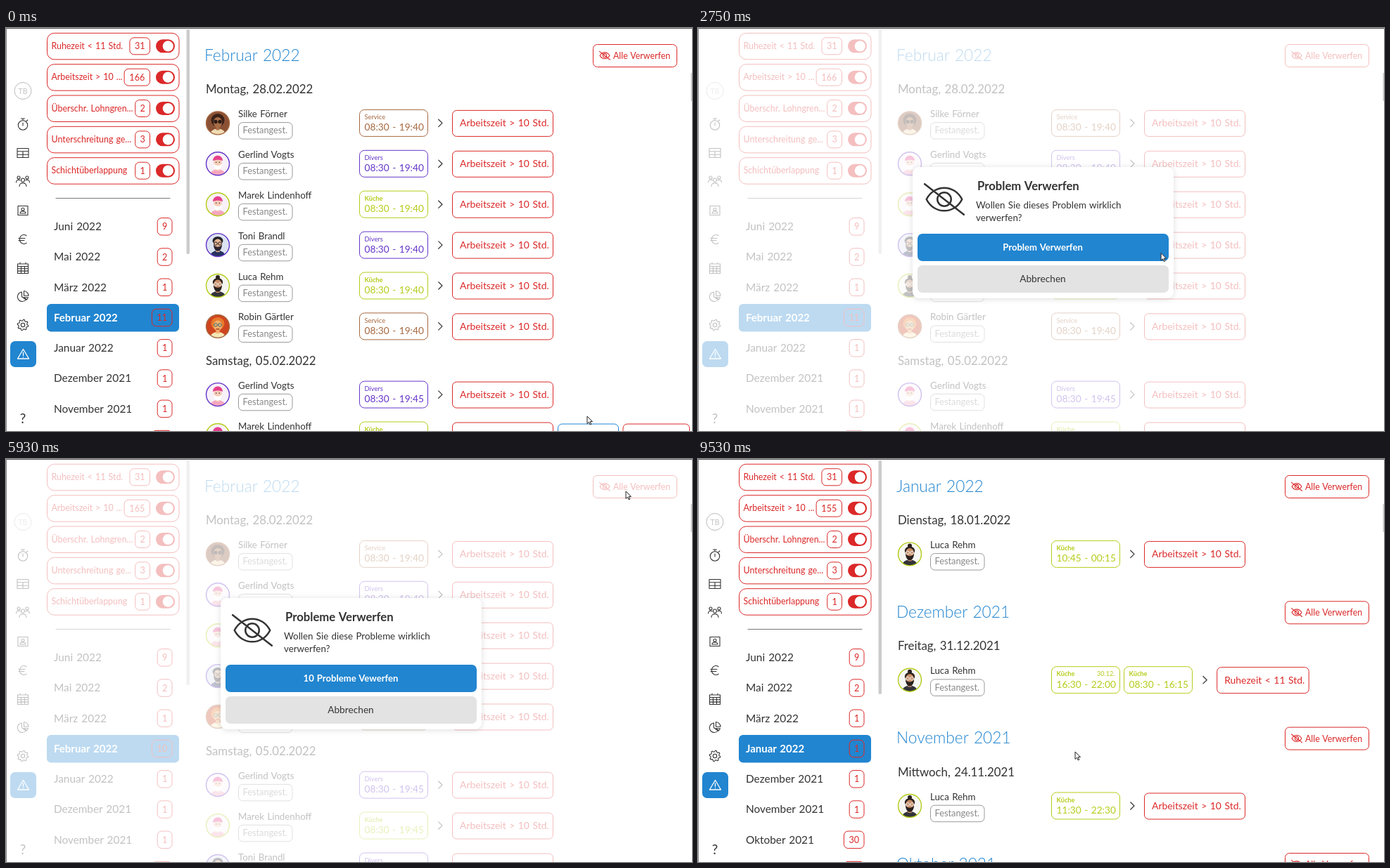
An HTML page for the animation above (9.55 s loop, 975 by 574 pixels).

```html
<!DOCTYPE html>
<html lang="de">
<head>
<meta charset="utf-8">
<title>Probleme verwerfen</title>
<style>
  html, body { margin: 0; width: 100%; height: 100%; overflow: hidden; background: #fff; }
  svg { display: block; width: 100vw; height: 100vh; }
  text { font-family: Lato, "Open Sans", sans-serif; word-spacing: .07em; white-space: pre; }
  .dialog { filter: drop-shadow(0 1px 4px #0002); }
</style>
</head>
<body>
<svg id="stage" viewBox="0 0 975 574"></svg>
<script>
const LOOP = 9550;
const BLUE = '#2185d0', RED = '#db2828', VIOLET = '#6435c9', GREEN = '#b5cc18', BROWN = '#a5673f', INK = '#333';

// Drawing helpers
const text = (x, y, s, size, fill = INK, more = '') =>
  `<text x="${x}" y="${y}" font-size="${size}" fill="${fill}" ${more}>${s.replace('<', '&lt;')}</text>`;
const mid = (x, y, s, size, fill, more = '') => text(x, y, s, size, fill, `text-anchor="middle" ${more}`);
const box = (x, y, w, h, r, stroke, fill = 'none') =>
  `<rect x="${x}" y="${y}" width="${w}" height="${h}" rx="${r}" fill="${fill}" stroke="${stroke}"/>`;
const at = (x, y, body, more = '') => `<g transform="translate(${x} ${y})" ${more}>${body}</g>`;
const line = (d, stroke = INK, w = 1.2) =>
  `<path d="${d}" fill="none" stroke="${stroke}" stroke-width="${w}" stroke-linecap="round" stroke-linejoin="round"/>`;
const disc = (x, y, r, fill) => `<circle cx="${x}" cy="${y}" r="${r}" fill="${fill}"/>`;
const oval = (x, y, rx, ry, fill) => `<ellipse cx="${x}" cy="${y}" rx="${rx}" ry="${ry}" fill="${fill}"/>`;
const ringPath = (x, y, r) => `M${x - r} ${y}a${r} ${r} 0 1 0 ${2 * r} 0a${r} ${r} 0 1 0 ${-2 * r} 0`;

const eye = (x, y, scale, color, w) => at(x, y, `<g transform="scale(${scale})">` +
  line('M-8.8 0C-5-7.6 5-7.6 8.8 0C5 7.6-5 7.6-8.8 0Z' + ringPath(0, 0, 3.4) + 'M-9.7-7.6L9.7 7.6', color, w / scale) + '</g>');

// Avatars
const glasses = color => line(ringPath(-3, -2, 2.3) + ringPath(3, -2, 2.3), color, 1);
const shades = disc(-3, -2, 2.6, '#2a1a14') + disc(3, -2, 2.6, '#2a1a14');
const beard = color => `<path d="M-6-1C-6 12 6 12 6-1C4 4-4 4-6-1Z" fill="${color}"/>`;
const faces = {
  afro: { bg: '#8b5135', back: disc(0, -4, 9.5, '#3b2218'), skin: '#a86d47', shirt: '#efdcb5', front: shades },
  cap: { bg: '#f8f1f8', back: '', skin: '#f6cdb9', shirt: '#f4a6bd',
    front: beard('#fff') + '<path d="M-7-4C-7-14 7-14 7-4C3-6-3-6-7-4Z" fill="#e6408a"/>' + disc(-2.3, -2, .8, INK) + disc(2.3, -2, .8, INK) },
  quiff: { bg: '#dbe3f1', back: oval(0, -6, 7.5, 6, '#23222b'), skin: '#e9b896', shirt: '#27335f', front: beard('#2c2530') + glasses('#222') },
  bun: { bg: '#f6f6f2', back: disc(0, -12, 3, '#2a211e') + oval(0, -5, 7.2, 6, '#2a211e'), skin: '#c98f68', shirt: '#33343b', front: beard('#2a211e') + glasses('#eee') },
  curls: { bg: '#cf4520', back: oval(0, -4, 9.5, 9, '#e87a2c'), skin: '#f2ae6b', shirt: '#f5e6b5', front: glasses('#3c6f78') + line('M-2 4H2', '#a32b18') }
};
function avatar(x, y, ring, kind) {
  const f = faces[kind];
  return at(x, y, `<g clip-path="url(#round)">${disc(0, 0, 17, f.bg)}${f.back}${oval(0, 16, 11, 8, f.shirt)}` +
    `<rect x="-2.5" y="4" width="5" height="6" fill="${f.skin}"/>${oval(0, -1, 6, 7.5, f.skin)}${f.front}</g>` +
    `<circle r="16.5" fill="none" stroke="${ring}" stroke-width="1.4"/>`);
}

// Main column
const areas = { Service: BROWN, Divers: VIOLET, Küche: GREEN };
const people = {
  silke: ['Silke Förner', 'Service', 'afro'],
  gerlind: ['Gerlind Vogts', 'Divers', 'cap'],
  marek: ['Marek Lindenhoff', 'Küche', 'cap'],
  toni: ['Toni Brandl', 'Divers', 'quiff'],
  luca: ['Luca Rehm', 'Küche', 'bun'],
  robin: ['Robin Gärtler', 'Service', 'curls']
};
const LONG = 'Arbeitszeit > 10 Std.', REST = 'Ruhezeit < 11 Std.';

function shift(x, area, time, day = '') {
  const c = areas[area];
  return box(x + .5, -19, 97, 38, 7, c) +
    text(x + 7.5, -5.3, area, 9.3, c, area === 'Küche' ? 'font-weight="700"' : '') +
    text(x + 65, -5.3, day, 9.1, c) + text(x + 7.5, 11, time, 13.7, c);
}
function row(y, who, time, extra) {
  const [name, area, face] = people[who];
  const dx = extra ? 103.2 : 0;
  return at(0, y, avatar(301, 0, areas[area], face) +
    text(330, -8.5, name, 13.3) + box(330.5, -.8, 76.5, 23.5, 6, '#999') + text(336.5, 15, 'Festangest.', 12.8, '#888') +
    shift(502, area, time, extra && '30.12.') + (extra ? shift(605, area, extra) : '') +
    at(dx, 0, line('M614.7-5.2L620 0L614.7 5.2') + box(634.5, -18, extra ? 130.5 : 143, 37, 6, RED) +
      text(645, 5, extra ? REST : LONG, 13.9, RED)));
}
const title = (y, s) => text(282, y + 7.8, s, 22.7, BLUE, 'font-weight="300"') +
  box(834.5, y - 15.5, 119, 32, 6, RED) + eye(851, y + .3, .78, RED, 1.1) + text(863, y + 5, 'Alle Verwerfen', 12.4, RED);
const day = (y, s) => text(284, y + 6, s, 16.8);

const PITCH = 57.9;
function february(monday) {
  const sat = 135.4 + PITCH * monday.length - 9;
  return title(39, 'Februar 2022') + day(87, 'Montag, 28.02.2022') +
    monday.map((w, i) => row(135.4 + PITCH * i, w, '08:30 - 19:40')).join('') +
    day(sat, 'Samstag, 05.02.2022') +
    ['gerlind', 'marek', 'toni'].map((w, i) => row(sat + 48.3 + PITCH * i, w, '08:30 - 19:45')).join('');
}
function older() {
  const months = [
    ['Januar 2022', 'Dienstag, 18.01.2022', '10:45 - 00:15'],
    ['Dezember 2021', 'Freitag, 31.12.2021', '16:30 - 22:00', '08:30 - 16:15'],
    ['November 2021', 'Mittwoch, 24.11.2021', '11:30 - 22:30']
  ];
  return months.map(([m, d, time, extra], i) =>
    at(0, 179.3 * i, title(39, m) + day(87, d) + row(135.4, 'luca', time, extra))).join('') + title(577, 'Oktober 2021');
}

// Sidebar
function badge(right, y, n, h) {
  const w = 13 + 7.8 * String(n).length;
  return box(right - w, y - h / 2, w, h, 6, RED) + mid(right - w / 2, y + 4.5, String(n), 12.6, RED);
}
function sidebar(total, months, bar) {
  const filters = [['Ruhezeit < 11 Std.', 31], ['Arbeitszeit > 10 ...', total], ['Überschr. Lohngren...', 2],
    ['Unterschreitung ge...', 3], ['Schichtüberlappung', 1]];
  return filters.map(([s, n], i) => at(0, 25.8 + 44.35 * i,
      box(58.5, -18.5, 187.5, 37.5, 10, RED) + text(64.5, 4.2, s, 12.4, RED) + badge(204.5, 0, n, 24) +
      `<rect x="213" y="-9.5" width="27" height="19" rx="9.5" fill="${RED}"/>` + disc(230.3, 0, 7.6, '#fff'))).join('') +
    line('M71 242.5H233', '#777', 1) +
    months.map(([s, n], i) => at(0, 282.8 + 43.25 * i, i === 3
      ? `<rect x="58" y="-19.5" width="188" height="39.5" rx="6" fill="${BLUE}"/>` +
        text(68, 5.2, s, 15, '#fff', 'font-weight="700"') + badge(236, 0, n, 24.5)
      : text(68, 5.4, s, 15.4) + badge(236, 0, n, 24.5))).join('') +
    `<rect x="256.5" y="2" width="4.5" height="${bar}" rx="2" fill="#ccc"/>`;
}
const head = [['Juni 2022', 9], ['Mai 2022', 2], ['März 2022', 1]];
const tail = [['Januar 2022', 1], ['Dezember 2021', 1], ['November 2021', 1], ['Oktober 2021', 30]];
const scenes = [
  sidebar(166, [...head, ['Februar 2022', 11], ...tail], 320) + february(['silke', 'gerlind', 'marek', 'toni', 'luca', 'robin']),
  sidebar(165, [...head, ['Februar 2022', 10], ...tail], 320) + february(['silke', 'gerlind', 'marek', 'toni', 'robin']),
  sidebar(155, [...head, ...tail, ['September 2021', 24]], 333) + older()
];

// Icon rail
const icons = [
  [137, ringPath(0, 1.5, 6.7) + 'M-2.5-8H2.5M0-8V-5.2M0 2V-2M5.2-4.5L6.8-6'],
  [178, 'M-8-6.5H8V6.5H-8ZM-8-2.2H8M-8 2.2H8M0-2.2V6.5'],
  [218, ringPath(0, -1.5, 2.5) + ringPath(-6, -5, 2) + ringPath(6, -5, 2) + 'M-5 7.5C-5 1 5 1 5 7.5M-9.5 2C-9.5-2-6-2.5-4-1M9.5 2C9.5-2 6-2.5 4-1'],
  [260, 'M-7-6.5H7V6.5H-7Z' + ringPath(0, -1.8, 2) + 'M-4 4C-4 0 4 0 4 4Z'],
  [301, 'M5-5.2A6 6.5 0 1 0 5 5.2M-6-1.5H3M-6 1.5H2'],
  [342, 'M-7.5-6H7.5V7.5H-7.5ZM-7.5-2.5H7.5M-7.5 .8H7.5M-7.5 4.1H7.5M-2.5-2.5V7.5M2.5-2.5V7.5M-4-8V-6M4-8V-6'],
  [382, 'M-1.5-6A6.8 6.8 0 1 0 4.5 5L-1.5 .8ZM1.5-7.5A7 7 0 0 1 8-.8H1.5ZM1.5 1.8H7.5L5.5 5Z']
];
const gear = Array.from({ length: 32 }, (_, i) => {
  const r = i % 4 < 2 ? 7.8 : 6, a = (i + .5) * Math.PI / 16;
  return `${i ? 'L' : 'M'}${(r * Math.cos(a)).toFixed(2)} ${(r * Math.sin(a)).toFixed(2)}`;
}).join('') + 'Z' + ringPath(0, 0, 2.7);
const rail = box(12, 77.5, 24, 24, 12, '#bbb') + mid(24, 93.5, 'TB', 10.5, '#c4c4c4') +
  [...icons, [423, gear]].map(([y, d]) => at(24, y, line(d, INK, 1.1))).join('') +
  `<rect x="6" y="446" width="37" height="37" rx="7" fill="${BLUE}"/>` +
  at(24.5, 464.5, line('M0-7L8 6.5H-8ZM0-2.5V2M0 4.2V4.3', '#fff', 1.3)) + mid(24, 563, '?', 19);

// Row actions, dialogs, pointers
const actions = box(784.5, -16, 86, 32, 6, BLUE) +
  at(801, 0, line('M-5 5L-4 1.5L2.5-5L5-2.5L-1.5 4ZM.8-3.3L3.3-.8', BLUE)) + text(813.5, 4.5, 'Beheben', 12.4, BLUE) +
  box(877, -16, 94.5, 32, 6, RED) + eye(893.5, 0, .78, RED, 1.1) + text(906, 4.5, 'Verwerfen', 12.4, RED);

const dialog = (head, ask, go) =>
  `<g class="dialog"><rect x="305" y="198" width="371" height="187" rx="9" fill="#fff"/></g>` +
  eye(350, 244, 2.87, INK, 2.5) + text(397, 230.5, head, 16.7, INK, 'font-weight="700"') +
  text(395, 257.3, ask, 13.35) + text(395, 275, 'verwerfen?', 13.35) +
  `<rect x="312" y="293" width="357" height="39" rx="7" fill="${BLUE}"/>` + mid(490, 316.8, go, 13.1, '#fff', 'font-weight="700"') +
  `<rect x="312" y="338" width="357" height="39" rx="7" fill="#e3e3e3"/>` + mid(490, 362, 'Abbrechen', 13.7);

const outlined = d => `<path d="${d}" fill="#fff" stroke="#222" stroke-width="1" stroke-linejoin="round"/>`;
const pointers = {
  arrow: outlined('M0 0V10.5L2.5 8.2L4.2 12L5.8 11.3L4.2 7.6H7.5Z'),
  hand: outlined('M-1.2 1Q0-1 1.2 1V5L4.5 5.8Q6 6.2 5.8 8L5 13H-2L-5 8.5Q-4.8 6.6-3 7.8L-1.2 9Z'),
  beam: line('M-2.5-5.5Q0-5.5 0-4Q0-5.5 2.5-5.5M0-4V4M-2.5 5.5Q0 5.5 0 4Q0 5.5 2.5 5.5', '#222', 1.1)
};

const hidden = (id, body) => `<g id="${id}" display="none">${body}</g>`;
const stage = document.getElementById('stage');
stage.innerHTML =
  `<defs><clipPath id="round"><circle r="16.5"/></clipPath><clipPath id="pane"><rect width="972" height="574"/></clipPath></defs>` +
  rail + scenes.map((s, i) => hidden('scene' + i, s)).join('') +
  `<g clip-path="url(#pane)">${hidden('actions', actions)}</g>` +
  `<rect id="veil" width="975" height="574" fill="#fff" opacity="0"/>` +
  hidden('dialog0', dialog('Problem Verwerfen', 'Wollen Sie dieses Problem wirklich', 'Problem Verwerfen')) +
  hidden('dialog1', dialog('Probleme Verwerfen', 'Wollen Sie diese Probleme wirklich', '10 Probleme Vewerfen')) +
  `<rect x="973.5" y="64" width="1.5" height="40" fill="#ccc"/>` +
  `<rect width="975" height="1" fill="#555"/><rect width="1" height="574" fill="#888"/>` +
  Object.entries(pointers).map(([k, s]) => hidden(k, s)).join('');
const el = id => document.getElementById(id);
const show = (id, on) => el(id).setAttribute('display', on ? 'inline' : 'none');

// Timeline: [ms, x, y, pointer from here on]
const path = [
  [0, 826, 553, 'arrow'], [60, 826, 553, 'arrow'], [780, 838, 307, 'hand'], [1060, 838, 307, 'hand'],
  [1600, 922, 364, 'hand'], [2183, 922, 364, 'arrow'], [2350, 922, 364, 'arrow'], [2900, 600, 311, 'hand'],
  [2960, 600, 311, 'hand'], [3020, 590, 301, 'hand'], [3713, 590, 307, 'beam'], [4260, 590, 307, 'arrow'],
  [4540, 730, 141, 'beam'], [4640, 730, 141, 'arrow'], [5180, 881, 46, 'hand'], [5700, 881, 46, 'arrow'],
  [5960, 881, 46, 'arrow'], [6550, 630, 222, 'arrow'], [6610, 630, 222, 'arrow'], [7040, 568, 303, 'hand'],
  [7865, 568, 305, 'beam'], [8950, 568, 305, 'arrow'], [9220, 513, 547, 'arrow'], [9520, 536, 417, 'arrow'], [LOOP, 536, 417, 'arrow']
];
const swaps = [3470, 7650];
const modals = [[2183, 3513], [5700, 7665]];
const FADE = 200;

const clamp = v => Math.min(1, Math.max(0, v));
const smooth = p => p * p * (3 - 2 * p);

function pointerAt(t) {
  const i = path.findIndex(p => p[0] > t) - 1;
  const [t0, x0, y0, kind] = path[i], [t1, x1, y1] = path[i + 1];
  const jump = t1 - t0 > 600 && Math.hypot(x1 - x0, y1 - y0) < 10;
  const p = jump ? 0 : smooth((t - t0) / (t1 - t0));
  return { x: x0 + (x1 - x0) * p, y: y0 + (y1 - y0) * p, kind };
}

// Centre of the row under the pointer, or null
function rowAt(scene, y) {
  const count = 6 - scene;
  const rows = scene === 2
    ? [0, 1, 2].map(i => 135.4 + 179.3 * i)
    : Array.from({ length: count + 3 }, (_, i) => 135.4 + PITCH * i + (i >= count ? 39.3 : 0));
  const i = rows.findIndex(c => Math.abs(y - c) < PITCH / 2);
  return i < 0 ? null : { y: rows[i], dx: scene === 2 && i === 1 ? 90.5 : 0 };
}

function draw(t) {
  const scene = swaps.filter(s => t >= s).length;
  scenes.forEach((_, i) => show('scene' + i, i === scene));

  let veil = 0;
  modals.forEach(([open, close], i) => {
    const a = clamp((t - open) / FADE) - clamp((t - close) / FADE);
    const d = el('dialog' + i);
    show('dialog' + i, a > 0);
    d.setAttribute('opacity', a);
    d.setAttribute('transform', `translate(490 292) scale(${.8 + .2 * a}) translate(-490 -292)`);
    veil = Math.max(veil, a);
  });
  el('veil').setAttribute('opacity', .7 * veil);

  const p = pointerAt(t);
  for (const k in pointers) show(k, k === p.kind);
  el(p.kind).setAttribute('transform', `translate(${p.x} ${p.y})`);

  const blocked = modals.some(([open, close]) => t >= open && t < close + FADE);
  const hit = blocked ? null : rowAt(scene, p.y);
  show('actions', hit);
  if (hit) el('actions').setAttribute('transform', `translate(${hit.dx} ${hit.y})`);
}

const start = performance.now();
function tick() {
  draw((performance.now() - start) % LOOP);
  requestAnimationFrame(tick);
}
tick();
</script>
</body>
</html>
```
